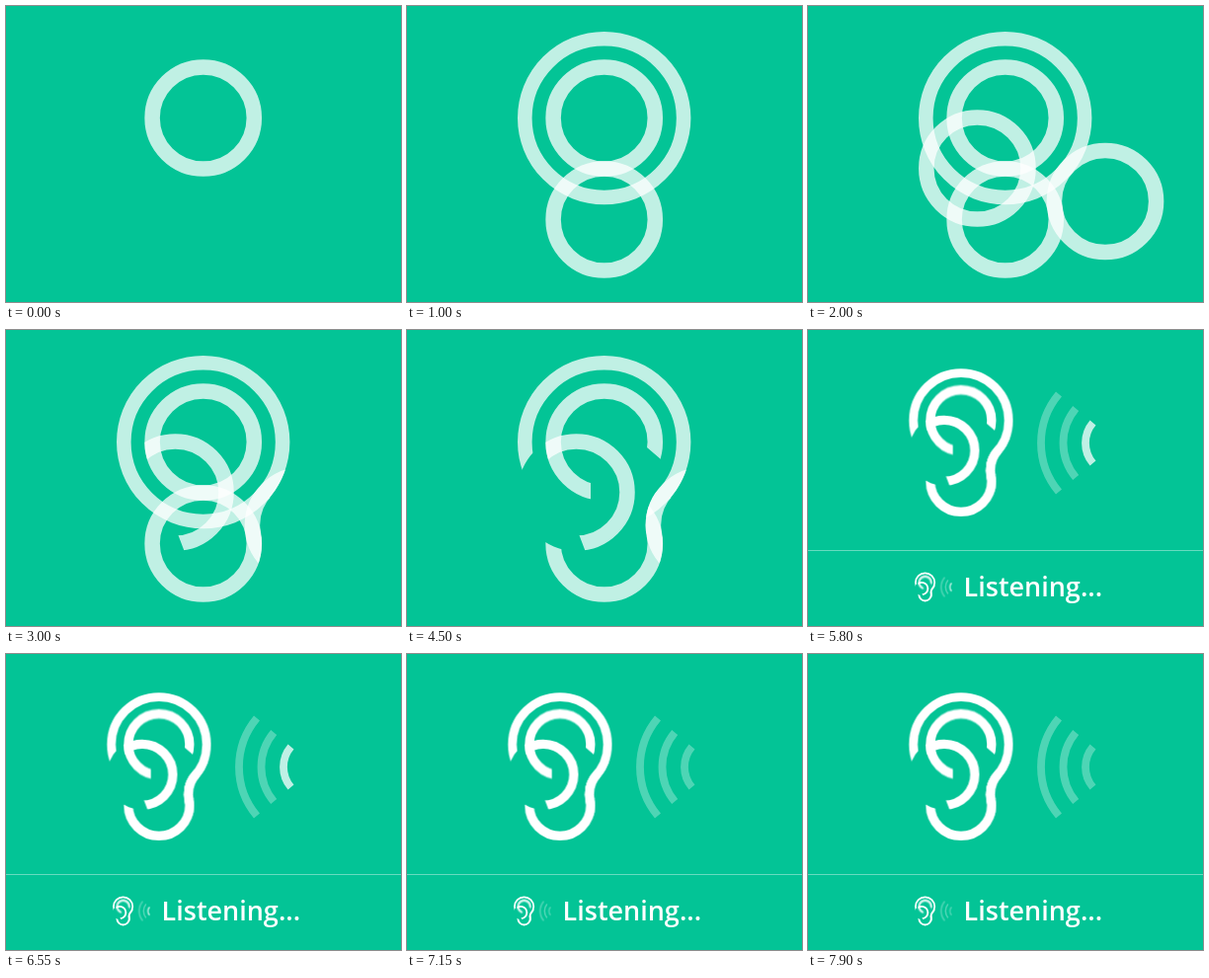
Animation, 400 px wide and 300 px high, one loop 8000 ms. Source, as an HTML page:

```html
<!DOCTYPE html>
<html lang="en">
<head>
<meta charset="utf-8">
<title>Listening</title>
<style>
  html, body { margin: 0; width: 100%; height: 100%; overflow: hidden; background: #03c496; }
  svg { display: block; width: 400px; height: 300px; fill: none; stroke: #fff; stroke-width: 15.5px; }

  .ring, .wave, .ear, .scene { animation: 8s step-end infinite; }
  .ring, .ear, .scene { opacity: 0; }
  .wave { opacity: .3; stroke-width: 7.8px; animation-name: pulse; }
  .mid { animation-delay: .15s; }
  .near { animation-delay: .3s; }
  .a { animation-name: a; }
  .b { animation-name: b; }
  .c { animation-name: c; }
  .d { animation-name: d; }
  .e { animation-name: e; }
  .ear { animation-name: ear; }
  .scene { animation-name: scene; }

  /* each ring appears whole, then is cut to its part of the ear */
  @keyframes a {
    0% { opacity: .75; clip-path: none; }
    56.25% { clip-path: url(#cutA); }
    62.5%, 100% { opacity: 0; }
  }
  @keyframes b {
    0% { opacity: 0; clip-path: none; }
    6.25% { opacity: .75; }
    50% { clip-path: url(#cutB); }
    62.5%, 100% { opacity: 0; }
  }
  @keyframes c {
    0% { opacity: 0; clip-path: none; }
    12.5% { opacity: .75; }
    43.75% { clip-path: url(#cutC); }
    62.5%, 100% { opacity: 0; }
  }
  @keyframes d {
    0% { opacity: 0; clip-path: none; }
    18.75% { opacity: .75; }
    37.5% { clip-path: url(#cutD); }
    62.5%, 100% { opacity: 0; }
  }
  @keyframes e {
    0% { opacity: 0; clip-path: none; }
    25% { opacity: .75; }
    31.25% { clip-path: url(#cutE); }
    62.5%, 100% { opacity: 0; }
  }
  @keyframes ear {
    0% { opacity: 0; }
    62.5% { opacity: 1; }
    72.5%, 100% { opacity: 0; }
  }
  @keyframes scene {
    0% { opacity: 0; }
    72.5%, 100% { opacity: 1; }
  }
  @keyframes pulse {
    0%, 76.25%, 85.625%, 95%, 100% { opacity: .3; }
    72.5%, 81.875%, 91.25% { opacity: .75; }
  }

  .line { stroke-width: 1px; opacity: .4; }
  text { font: 600 27px "Open Sans", "Noto Sans", sans-serif; fill: #fff; stroke: none; }
</style>
</head>
<body>
<svg viewBox="0 0 400 300">
  <defs>
    <circle id="a" cx="199.7" cy="113.5" r="51.6"/>
    <circle id="b" cx="199.7" cy="216.5" r="51.6"/>
    <circle id="c" cx="199.7" cy="113.6" r="80.4" stroke-width="14.6"/>
    <circle id="d" cx="301" cy="198" r="51.6"/>
    <circle id="e" cx="171.4" cy="164.5" r="51.6"/>

    <clipPath id="outsideE">
      <path clip-rule="evenodd" d="M0 0H400V300H0ZM112 164.5a59.4 59.4 0 0 0 118.8 0a59.4 59.4 0 0 0 -118.8 0Z"/>
    </clipPath>
    <clipPath id="cutA">
      <path d="M186 300V113.5L236 113L271 143L400 0H0V300Z"/>
    </clipPath>
    <clipPath id="cutB" clip-path="url(#outsideE)">
      <path d="M199.7 216.5L397 180L400 300H0V180Z"/>
      <circle cx="301" cy="198" r="59.4"/>
    </clipPath>
    <clipPath id="cutC" clip-path="url(#outsideE)">
      <path d="M199.7 113.6L353 241L400 0H0V300Z"/>
      <circle cx="301" cy="198" r="59.4"/>
    </clipPath>
    <clipPath id="cutD">
      <path d="M301 198L199.7 113.6V216.5Z"/>
      <circle cx="199.7" cy="113.6" r="87.7"/>
      <circle cx="199.7" cy="216.5" r="59.4"/>
    </clipPath>
    <clipPath id="cutE">
      <circle cx="199.7" cy="113.5" r="59.4"/>
      <path d="M171.5 140V200.2L205 288.6L400 300V140Z"/>
    </clipPath>

    <g id="ear">
      <use href="#a" clip-path="url(#cutA)"/>
      <use href="#b" clip-path="url(#cutB)"/>
      <use href="#c" clip-path="url(#cutC)"/>
      <use href="#d" clip-path="url(#cutD)"/>
      <use href="#e" clip-path="url(#cutE)"/>
    </g>
    <use id="smallEar" href="#ear" transform="translate(35.1 23.5) scale(.6)"/>

    <!-- arcs around (313, 114.5), 40 degrees either side -->
    <path id="far" d="M288.5 93.9A32 32 0 0 0 288.5 135.1"/>
    <path id="mid" d="M271.2 79.5A54.5 54.5 0 0 0 271.2 149.5"/>
    <path id="near" d="M254 65A77 77 0 0 0 254 164"/>
  </defs>

  <use class="ring a" href="#a"/>
  <use class="ring b" href="#b"/>
  <use class="ring c" href="#c"/>
  <use class="ring d" href="#d"/>
  <use class="ring e" href="#e"/>
  <use class="ear" href="#ear"/>

  <g class="scene">
    <g>
      <use href="#smallEar"/>
      <use class="wave" href="#far"/>
      <use class="wave mid" href="#mid"/>
      <use class="wave near" href="#near"/>
    </g>
    <g transform="translate(87.6 237.6) scale(.2)">
      <use href="#smallEar"/>
      <use class="wave" href="#far"/>
      <use class="wave mid" href="#mid"/>
      <use class="wave near" href="#near"/>
    </g>
    <path class="line" d="M0 223.5H400"/>
    <text x="157.6" y="270">Listening...</text>
  </g>
</svg>
</body>
</html>
```
